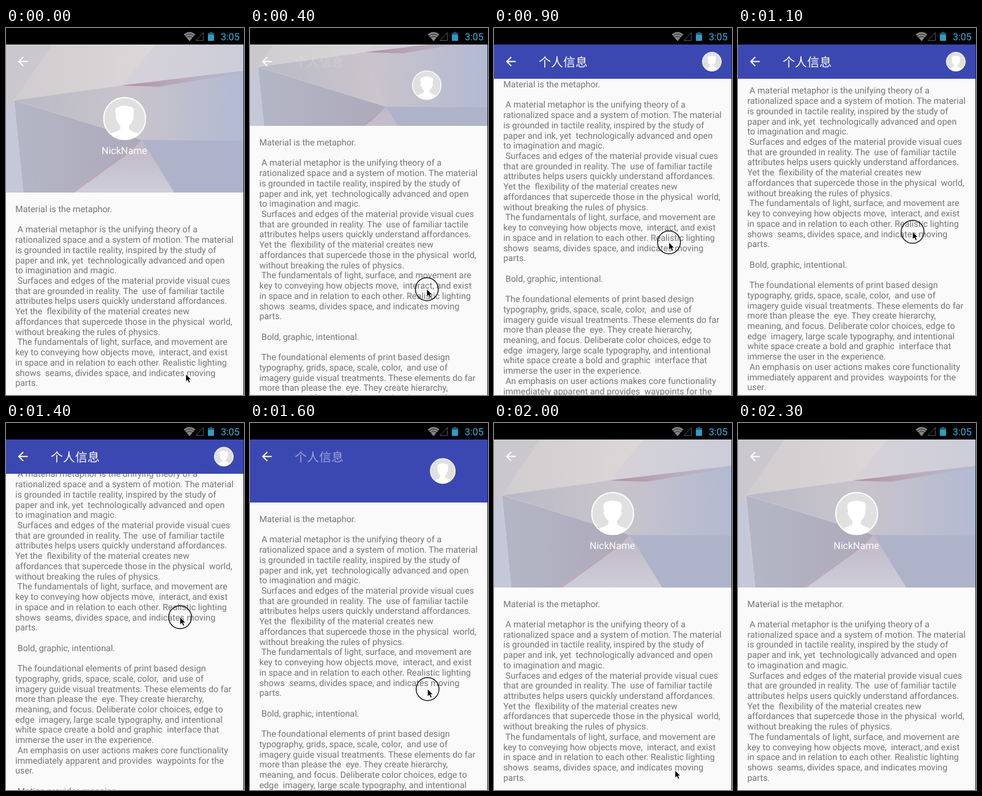
Write an HTML page that moves like this. It is 389 px wide and 600 px high and loops after 2.4 s.

```html
<!DOCTYPE html>
<html lang="en">
<head>
<meta charset="utf-8">
<title>Collapsing profile header</title>
<style>
html, body { margin: 0; width: 100%; height: 100%; overflow: hidden; background: #fafafa; }
svg { display: block; width: 389px; height: 600px; }
text { font-family: Roboto, sans-serif; white-space: pre; text-rendering: geometricPrecision; }
#copy text { font-size: 14.33px; fill: #747474; }
#nick { font-size: 16px; text-anchor: middle; fill: #fff; }
#title { font-family: "Noto Sans CJK SC", "Noto Sans CJK", sans-serif; font-size: 20px; fill: #fff; }
</style>
</head>
<body>
<svg viewBox="0 0 389 600">
  <defs>
    <clipPath id="headerClip"><rect id="headerBox" y="27" width="389" height="242"/></clipPath>
    <clipPath id="faceClip"><circle r="34"/></clipPath>
    <linearGradient id="top"><stop stop-color="#d0cdd0"/><stop offset="1" stop-color="#dcd7d7"/></linearGradient>
    <linearGradient id="corner"><stop stop-color="#d6d2d8"/><stop offset="1" stop-color="#cccdda"/></linearGradient>
    <linearGradient id="right"><stop stop-color="#cbc4cb"/><stop offset="1" stop-color="#b2bad2"/></linearGradient>
    <linearGradient id="middle"><stop stop-color="#b8b9c6"/><stop offset="1" stop-color="#ccc6cc"/></linearGradient>
    <linearGradient id="lower"><stop stop-color="#b4b6c6"/><stop offset="1" stop-color="#ada9ba"/></linearGradient>
    <linearGradient id="base" x2="0" y2="1"><stop stop-color="#bfb7c5"/><stop offset="1" stop-color="#cfcdda"/></linearGradient>
    <linearGradient id="shade"><stop stop-color="#ad8f9c"/><stop offset="1" stop-color="#bdb0c2" stop-opacity=".3"/></linearGradient>
  </defs>

  <rect width="389" height="600" fill="#fafafa"/>
  <g id="copy"></g>

  <g clip-path="url(#headerClip)">
    <g id="photo">
      <rect y="26" width="389" height="244" fill="#c6c5d0"/>
      <path d="M0 26H76L13 118 0 134Z" fill="#cbc8cd"/>
      <path d="M76 26H245L188 94 13 118Z" fill="url(#top)"/>
      <path d="M245 26H389V70L188 94Z" fill="url(#corner)"/>
      <path d="M188 94L389 70V184L222 183Z" fill="url(#right)"/>
      <path d="M188 94L389 70V73L250 96Z" fill="url(#shade)"/>
      <path d="M13 118L188 94 222 183Z" fill="url(#middle)"/>
      <path d="M13 118L222 183 105 269H28Z" fill="url(#lower)"/>
      <path d="M0 134L13 118 28 269H0Z" fill="#c5c8d8"/>
      <path d="M222 183L275 269H105Z" fill="url(#base)"/>
      <path d="M222 183L105 269H112L200 205Z" fill="#a78f9f" opacity=".5"/>
      <path d="M222 183L389 184V269H275Z" fill="#aeb3ca"/>
      <path d="M13 118L188 94 245 26M13 118L28 269M13 118L222 183" fill="none" stroke="#e2dde3" stroke-width=".7" opacity=".5"/>
    </g>
    <rect id="scrim" y="26" width="389" height="244" fill="#3b48b2"/>
  </g>

  <text id="title" x="73" y="63">个人信息</text>
  <text id="nick">NickName</text>
  <g id="avatar">
    <circle r="34" fill="#e0e0e0"/>
    <path clip-path="url(#faceClip)" fill="#fff" d="M-14-4Q-18-17-10-19Q-2-23 11-19Q17-17 14-4Q16-1 13 3Q11 9 7 12V17Q11 21 19 23Q26 25 28 35H-28Q-26 25-19 23Q-11 21-7 17V12Q-11 9-13 3Q-16-1-14-4Z"/>
    <circle r="34.2" fill="none" stroke="#fff" stroke-width="2"/>
  </g>
  <path transform="translate(15.5 42.8)" fill="#fff" d="M20 11H7.8l5.6-5.6L12 4l-8 8 8 8 1.4-1.4L7.8 13H20z"/>

  <rect width="389" height="27"/>
  <path d="M300 21.5L290.5 10.5Q300 2.5 309.5 10.5Z" fill="#858585"/>
  <path d="M292.500 13Q300 6.500 307.500 13M295 16Q300 11.500 305 16" fill="none" stroke="#222"/>
  <path d="M310.500 20.500H322.500V7.500Z" fill="none" stroke="#4c5662"/>
  <path d="M330 8H333V6.500H337V8H340V21H330Z" fill="#1d5f78"/>
  <rect x="330" y="11" width="10" height="10" fill="#2d9dc7"/>
  <text x="351" y="20" font-size="16" fill="#33b5e5">3:05</text>
  <path d="M388.500 27V600" stroke="#222"/>

  <g id="pointer">
    <circle id="press" r="18.700" fill="none" stroke="#111" stroke-width="1.400"/>
    <path d="M0 0V12L2.800 9.500 5 14 7 13 5 8.700H8.500Z" stroke="#fff" stroke-width=".6"/>
  </g>
</svg>
<script>
const LOOP = 2400, STEP = 100;
const STATUS_BAR = 27, OPEN = 269, CLOSED = 83, LINE = 16.72;

const copy = `Material is the metaphor.

 A material metaphor is the unifying theory of a
rationalized space and a system of motion. The material
is grounded in tactile reality, inspired by the study of
paper and ink, yet  technologically advanced and open
to imagination and magic.
 Surfaces and edges of the material provide visual cues
that are grounded in reality. The  use of familiar tactile
attributes helps users quickly understand affordances.
Yet the  flexibility of the material creates new
affordances that supercede those in the physical  world,
without breaking the rules of physics.
 The fundamentals of light, surface, and movement are
key to conveying how objects move,  interact, and exist
in space and in relation to each other. Realistic lighting
shows  seams, divides space, and indicates moving
parts.

 Bold, graphic, intentional.

 The foundational elements of print based design
typography, grids, space, scale, color,  and use of
imagery guide visual treatments. These elements do far
more than please the  eye. They create hierarchy,
meaning, and focus. Deliberate color choices, edge to
edge  imagery, large scale typography, and intentional
white space create a bold and graphic  interface that
immerse the user in the experience.
 An emphasis on user actions makes core functionality
immediately apparent and provides  waypoints for the
user.

 Motion provides meaning.`;

// [time, value] pairs
const contentTop = [[0, 269], [100, 266], [200, 244], [300, 204], [400, 160], [500, 119], [600, 90.5],
  [700, 80], [900, 65], [1100, 42], [1300, 22], [1400, 23], [1500, 62], [1600, 130], [1700, 205],
  [1800, 252], [1900, 265], [2000, 268.5]];
const pointerX = [[0, 294], [400, 289], [600, 286], [900, 286], [1400, 284.5], [1800, 296]];
const pointerY = [[0, 566], [100, 558], [200, 521], [300, 473], [400, 427], [600, 380], [900, 350.5],
  [1300, 316], [1400, 317.5], [1500, 366], [1600, 435], [1700, 508], [1800, 556], [1900, 568]];
const scrimFade = [[450, 0], [750, 1], [1600, 1], [2000, 0]];

const $ = id => document.getElementById(id);
const clamp = v => Math.max(0, Math.min(1, v));
const mix = (a, b, k) => a + (b - a) * k;
const move = (id, x, y, scale = 1) =>
  $(id).setAttribute("transform", `translate(${x} ${y}) scale(${scale})`);

function sample(keys, t) {
  const i = keys.findIndex(([time]) => time > t);
  if (i === 0) return keys[0][1];
  if (i < 0) return keys[keys.length - 1][1];
  const [t0, v0] = keys[i - 1], [t1, v1] = keys[i];
  return mix(v0, v1, (t - t0) / (t1 - t0));
}

copy.split("\n").forEach((line, i) => {
  const text = document.createElementNS("http://www.w3.org/2000/svg", "text");
  text.setAttribute("x", 15.2);
  text.setAttribute("y", 32 + i * LINE);
  text.textContent = line;
  $("copy").append(text);
});

function render(t) {
  const top = sample(contentTop, t);
  const bottom = Math.max(CLOSED, Math.round(top));
  const collapse = (OPEN - bottom) / (OPEN - CLOSED);

  move("copy", 0, top);
  $("headerBox").setAttribute("height", bottom - STATUS_BAR);
  move("photo", 0, (bottom - OPEN) / 2);
  $("scrim").setAttribute("opacity", sample(scrimFade, t));

  const x = mix(194, 356, collapse), y = mix(148, 55, collapse), r = mix(35, 16, collapse);
  move("avatar", x, y, r / 35);
  move("nick", x - .5, y + r + 23);
  $("nick").setAttribute("opacity", clamp(1 - collapse * 2));
  $("title").setAttribute("opacity", clamp(collapse * 2 - 1));

  move("pointer", sample(pointerX, t), sample(pointerY, t));
  $("pointer").setAttribute("visibility", t < 2100 ? "visible" : "hidden");
  $("press").setAttribute("opacity", t >= 100 && t < 1900 ? 1 : 0);
}

let start;
function tick(now) {
  start ??= now;
  render(Math.floor(((now - start) % LOOP) / STEP) * STEP);
  requestAnimationFrame(tick);
}
render(0);
requestAnimationFrame(tick);
</script>
</body>
</html>
```
